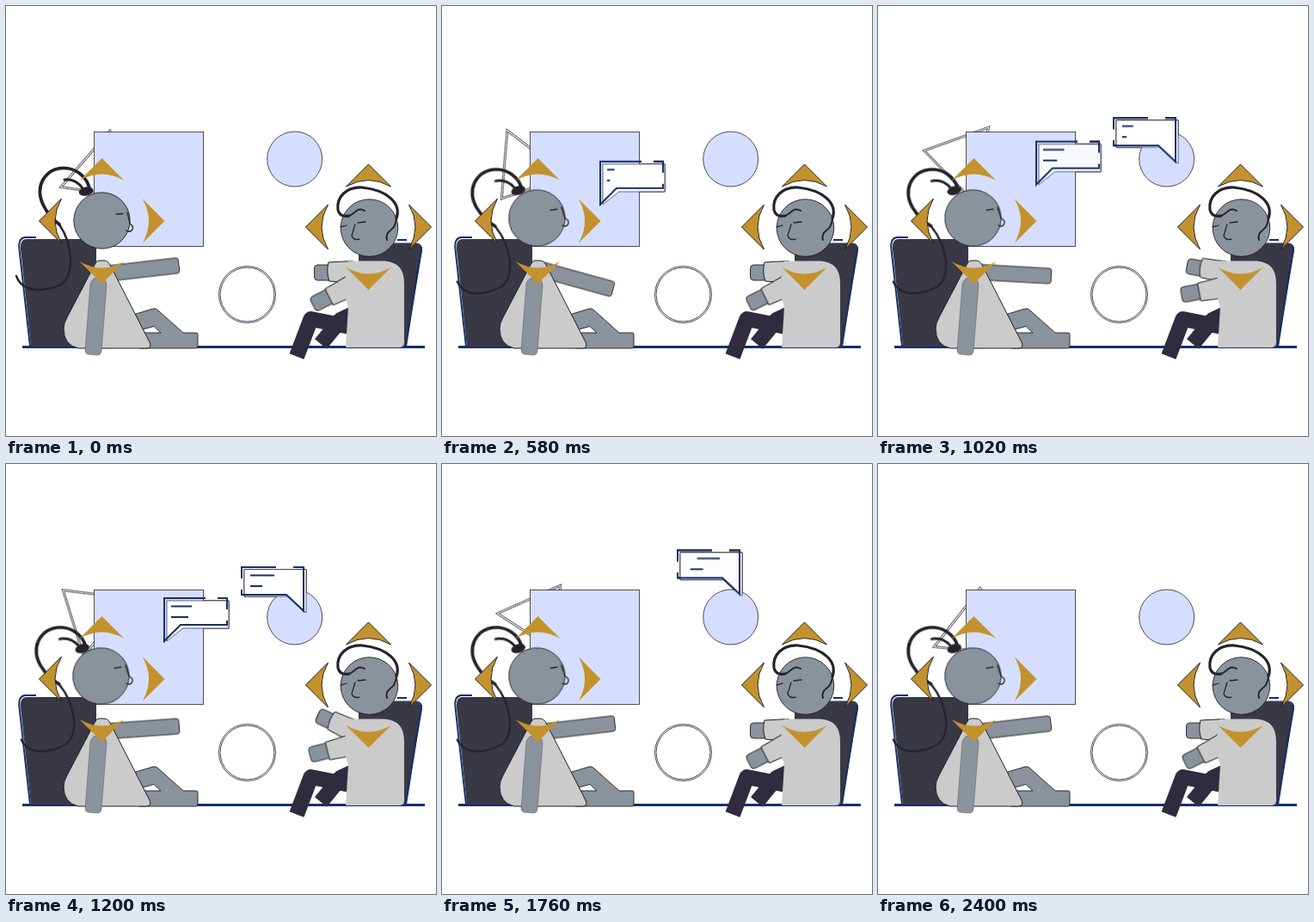
Animation of 500 by 500 pixels, one loop 2.42 s. Source, as an HTML page without scripts:

```html
<!DOCTYPE html>
<html lang="en">
<head>
<meta charset="utf-8">
<title>Conversation</title>
<style>
html, body { margin: 0; width: 100%; height: 100%; overflow: hidden; background: #fff; }
svg { display: block; width: 100%; height: 100%; }

.move { animation: 2420ms linear infinite; }
.skin { fill: #8a939b; stroke: #1c1e24; stroke-width: .9; }
.cloth { fill: #cbcbcb; }
.seat { fill: #393845; }
.panel { fill: #d6deff; stroke: #25272c; stroke-width: .8; }
.blue { fill: none; stroke: #15306a; stroke-width: 2; }
.hair { fill: none; stroke: #24232c; stroke-linecap: round; stroke-linejoin: round; }
.face { fill: none; stroke: #24232c; stroke-width: 1.3; stroke-linecap: round; }
.arrow { fill: #c4922d; }
.edged { stroke: #1c1e24; stroke-width: 1; }

.triangle { transform-origin: 105px 184px; animation-name: spin; }
.head { transform-origin: 81px 259px; animation-name: nod; }
.reach { transform-origin: 128px 310px; animation-name: reach; }
.upper { transform-origin: 401px 310px; animation-name: upper; }
.lower { transform-origin: 395px 328px; animation-name: lower; }
.bubble-l { animation-name: rise-l, fade-l; }
.bubble-r { animation-name: rise-r, fade-r; }
.shade-l { animation-name: rise-l, show-l; animation-timing-function: linear, step-end; }
.shade-r { animation-name: rise-r, show-r; animation-timing-function: linear, step-end; }
.tint-l { animation-name: tint-l; }
.tint-r { animation-name: tint-r; }
.long-l { animation-name: long-l; }
.short-l { animation-name: short-l; }
.long-r { animation-name: long-r; }
.short-r { animation-name: short-r; }

@keyframes spin { from { transform: rotate(131deg); } to { transform: rotate(491deg); } }
@keyframes nod {
  0%, 13% { transform: rotate(0deg); animation-timing-function: ease-in-out; }
  24%, 100% { transform: rotate(-5.7deg); }
}
@keyframes reach {
  0% { transform: rotate(-6.6deg); animation-timing-function: ease-in-out; }
  12.4%, 23% { transform: rotate(15.5deg); animation-timing-function: ease-in; }
  35.5% { transform: rotate(9.7deg); }
  49.6% { transform: rotate(-4deg); animation-timing-function: ease-out; }
  58%, 100% { transform: rotate(-6.6deg); }
}
@keyframes upper {
  0%, 36% { transform: rotate(0deg); animation-timing-function: ease-in-out; }
  49.6% { transform: rotate(25deg); animation-timing-function: ease-in-out; }
  62%, 100% { transform: rotate(0deg); }
}
@keyframes lower {
  0%, 22% { transform: rotate(0deg); animation-timing-function: ease-in-out; }
  35.5% { transform: rotate(19deg); }
  49.6% { transform: rotate(13deg); animation-timing-function: ease-in-out; }
  62%, 100% { transform: rotate(0deg); }
}
@keyframes rise-l {
  0%, 10.7% { transform: translate(184px, 204px); }
  12.4% { transform: translate(184px, 203px); animation-timing-function: ease-in-out; }
  35.5% { transform: translate(184px, 159px); }
  49.6% { transform: translate(184px, 156px); animation-timing-function: ease-in; }
  63.6% { transform: translate(184px, 119px); }
  68%, 100% { transform: translate(184px, 112px); }
}
@keyframes rise-r {
  0%, 34% { transform: translate(274px, 144px); }
  35.5% { transform: translate(274px, 142px); }
  44.6% { transform: translate(274px, 126px); }
  49.6% { transform: translate(274px, 120px); animation-timing-function: ease-out; }
  63.6% { transform: translate(274px, 114px); }
  67% { transform: translate(274px, 112px); animation-timing-function: ease-in-out; }
  82.6% { transform: translate(274px, 71px); }
  91%, 100% { transform: translate(274px, 69px); }
}
@keyframes fade-l {
  0%, 10.7% { opacity: 0; }
  12.4% { opacity: .24; }
  18.2%, 61.2% { opacity: 1; }
  63.6% { opacity: .66; }
  67.8%, 100% { opacity: 0; }
}
@keyframes fade-r {
  0%, 34.7% { opacity: 0; }
  35.5% { opacity: .15; }
  41.3%, 90.9% { opacity: 1; }
  95%, 100% { opacity: 0; }
}
@keyframes show-l { 0% { opacity: 0; } 11.2% { opacity: 1; } 67.5% { opacity: 0; } }
@keyframes show-r { 0% { opacity: 0; } 35% { opacity: 1; } 94.8% { opacity: 0; } }
@keyframes tint-l { 0%, 24% { fill: #fff; } 35.5% { fill: #f0f3ff; } 49% { fill: #fff; } 63%, 100% { fill: #f6f9ff; } }
@keyframes tint-r { 0%, 50% { fill: #fff; } 63.6% { fill: #f6f8ff; } 76%, 100% { fill: #fff; } }
@keyframes long-l {
  0%, 18% { stroke-dasharray: 0 0 0 99; }
  35.5% { stroke-dasharray: 0 0 25 99; }
  49.6% { stroke-dasharray: 0 0 24 99; }
  63.6% { stroke-dasharray: 0 18 35 99; }
  68%, 100% { stroke-dasharray: 0 28 25 99; }
}
@keyframes short-l {
  0%, 20% { stroke-dasharray: 0 0 0 99; }
  35.5% { stroke-dasharray: 0 0 13 99; }
  49.6% { stroke-dasharray: 0 0 20 99; }
  63.6% { stroke-dasharray: 0 6 14 99; }
  68%, 100% { stroke-dasharray: 0 11 9 99; }
}
@keyframes long-r {
  0%, 36% { stroke-dasharray: 0 0 0 99; }
  49.6% { stroke-dasharray: 0 0 28 99; }
  63.6% { stroke-dasharray: 0 0 25 99; }
  82.6% { stroke-dasharray: 0 26 28 99; }
  94%, 100% { stroke-dasharray: 0 54 0 99; }
}
@keyframes short-r {
  0%, 38% { stroke-dasharray: 0 0 0 99; }
  49.6% { stroke-dasharray: 0 0 14 99; }
  63.6% { stroke-dasharray: 0 0 19 99; }
  82.6% { stroke-dasharray: 0 10 10 99; }
  94%, 100% { stroke-dasharray: 0 20 0 99; }
}
</style>
</head>
<body>
<svg viewBox="0 0 500 500">
  <defs>
    <path id="arrow" d="M-26-47L0-73L26-47Q0-62-26-47Z"/>
    <path id="body-l" d="M3 3H75V35H22L3 50Z"/>
    <path id="line-l" fill="none" d="M48 0H0V50L19 31H73V26M73 13V0H62"/>
    <path id="body-r" d="M3 2.5H75V53L55 34H3Z"/>
    <path id="line-r" fill="none" d="M40 0H0V13M0 26V32H52L72 51V0H60"/>
    <path id="tri" fill="none" d="M109 130.500L65.500 197.500H152Z"/>
  </defs>

  <!-- backdrop -->
  <g class="move triangle">
    <use href="#tri" stroke="#25272c" stroke-width="2.6"/>
    <use href="#tri" stroke="#fff" stroke-width="1.1"/>
  </g>
  <g class="move shade-l" stroke="#000"><use href="#body-l"/><use href="#line-l" stroke-width="2"/></g>
  <g class="move shade-r" stroke="#000"><use href="#body-r"/><use href="#line-r" stroke-width="2"/></g>
  <rect class="panel" x="102.5" y="146.5" width="127" height="133"/>
  <circle class="panel" cx="335.7" cy="178" r="32"/>
  <g fill="none" stroke="#1f1e38" stroke-width=".8">
    <circle cx="280.5" cy="335.5" r="33"/>
    <circle cx="280.5" cy="335.5" r="31.4"/>
  </g>

  <!-- seats and floor -->
  <path class="blue" stroke-width="2.8" style="stroke-width: 2.8" d="M19 396.500H487"/>
  <path class="seat" d="M24 271H105V396H29L17 283Q16 271 24 271Z"/>
  <path class="blue" d="M35 269H22Q14 270 15.500 283L28 396"/>
  <path class="seat" d="M410 275.500H477Q485 276 484 285L465 396H410Z"/>
  <path class="blue" d="M455 272H466M483 280L465 396"/>

  <!-- left person -->
  <path class="skin" fill-rule="evenodd" d="M148 359L171 352Q174 351 177 354L206 380H221Q223 380 223 382V396Q223 398 221 398H155ZM159 376L172 372.500L180 380H161Z"/>
  <g class="move reach"><rect class="skin" x="112" y="301" width="89.5" height="18" rx="3"/></g>
  <path class="cloth edged" d="M108 296H114Q119 296 122 303L167 391Q170 398 163 398H84Q67 394 67 375Q67 369 71 362L103 301Q105 296 108 296Z"/>
  <path class="skin" style="stroke-width: .3" d="M102 317Q108 314 114 318Q117 320 117 325L111 402Q110 406 106 406L95 405Q92 404 92 400L98 323Q99 319 102 317Z"/>
  <g class="move head">
    <path class="hair" stroke-width="3.8" d="M97 212C91 187 57 179 43 202C32 222 49 244 62 254"/>
    <path class="hair" stroke-width="2.4" d="M62 254C78 278 80 312 64 324C48 331 20 336 12 314"/>
    <path class="hair" stroke-width="3" d="M68 202Q81 200 90 213"/>
    <circle class="skin" cx="111.5" cy="249.5" r="32.7"/>
    <ellipse cx="93" cy="215.5" rx="8.500" ry="5" fill="#24232c" transform="rotate(-12 93 215)"/>
    <path class="face" d="M128 242L136 241.500M141 240L144 253Q149 256 147 260Q144 264 140 261"/>
  </g>

  <!-- right person -->
  <g fill="none" stroke="#2f2c3f" stroke-width="18" stroke-linejoin="round">
    <path d="M406 357L389 365L366 393"/>
    <path d="M405 374L354.500 364L338 407.500"/>
  </g>
  <g class="move upper">
    <rect class="skin" x="358.5" y="301" width="24" height="18" rx="4"/>
    <path class="cloth edged" d="M375 298L403 296.500V322L376 320Q372 309 375 298Z"/>
  </g>
  <g class="move lower">
    <g transform="rotate(-27 395 328)">
      <rect class="skin" x="352" y="319" width="30" height="18" rx="4"/>
      <path class="cloth edged" d="M373 318L404 316V341L373 339Z"/>
    </g>
  </g>
  <path class="cloth" d="M398 296.500H440Q463 298 463 322V391Q463 397 457 397H395L398 350L392 330Z"/>
  <circle class="skin" cx="422.5" cy="258" r="33.3"/>
  <path class="hair" stroke-width="3.2" d="M399 244Q388 246 386 237C384 222 396 210 414 211C443 214 460 229 454 247"/>
  <path class="hair" stroke-width="2" d="M417 238C408 233 406 242 399 244M454 247Q453 257 447 261Q441 265 443 272"/>
  <path class="face" d="M389 257L396 255M409 252L418 251M406 254L402 267Q404 273 411 271"/>

  <!-- attention arrows -->
  <g class="arrow" transform="translate(111.500 250)">
    <use href="#arrow"/>
    <use href="#arrow" transform="rotate(90)"/>
    <use href="#arrow" transform="rotate(180)"/>
    <use href="#arrow" class="edged" transform="rotate(270)"/>
  </g>
  <g class="arrow" transform="translate(421.500 257)">
    <use href="#arrow" class="edged"/>
    <use href="#arrow" class="edged" transform="rotate(90)"/>
    <use href="#arrow" transform="rotate(180)"/>
    <use href="#arrow" class="edged" transform="rotate(270)"/>
  </g>

  <!-- speech bubbles -->
  <g class="move bubble-l">
    <g class="move tint-l" stroke="#25272c" stroke-width=".7"><use href="#body-l"/></g>
    <g class="blue">
      <use href="#line-l"/>
      <path class="move long-l" d="M8 9.500H61"/>
      <path class="move short-l" d="M8 22H28"/>
    </g>
  </g>
  <g class="move bubble-r">
    <g class="move tint-r" stroke="#25272c" stroke-width=".7"><use href="#body-r"/></g>
    <g class="blue">
      <use href="#line-r"/>
      <path class="move long-r" d="M10 9.500H64"/>
      <path class="move short-r" d="M10 22H30"/>
    </g>
  </g>
</svg>
</body>
</html>
```
